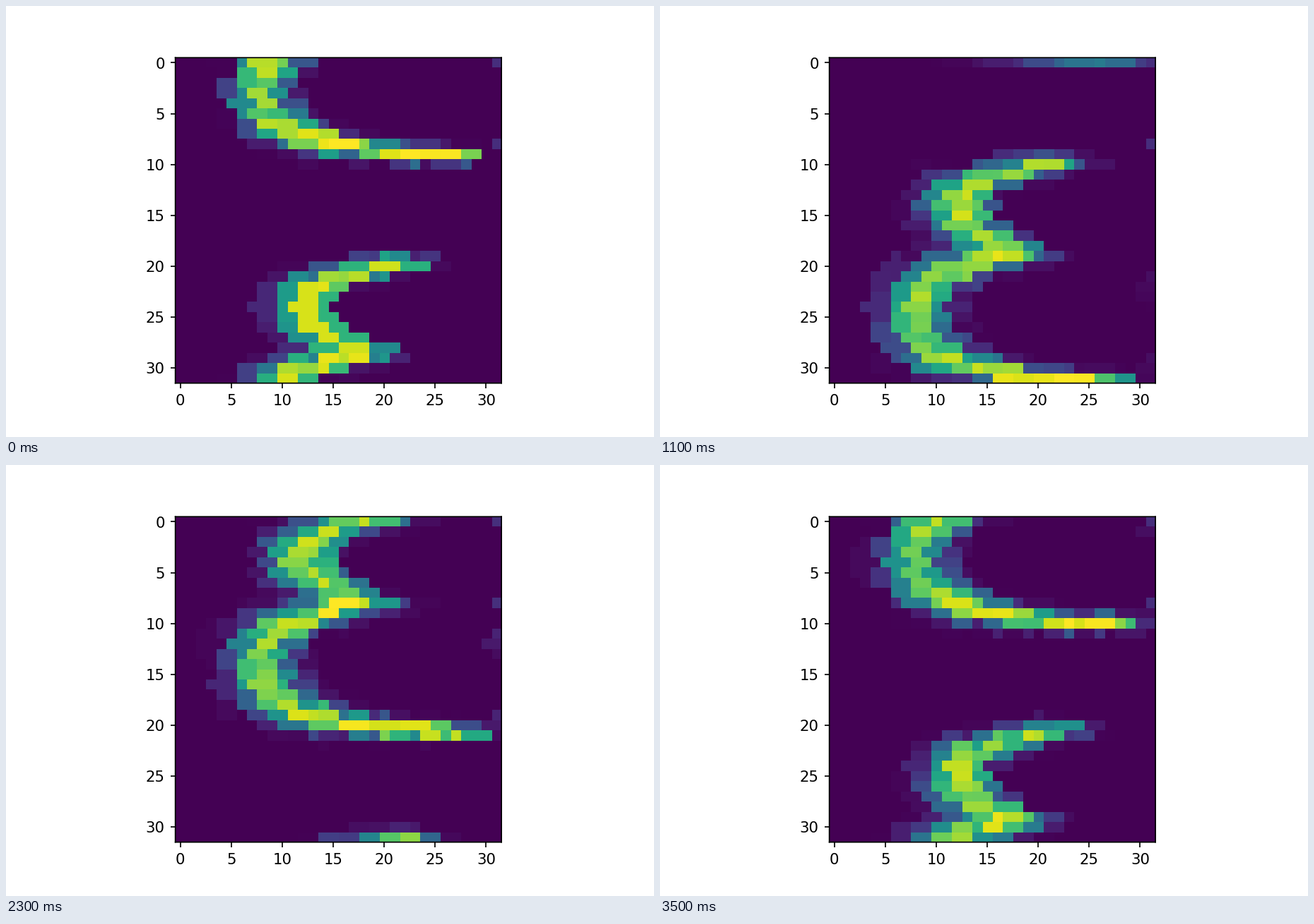
A matplotlib script that plays this animation: 917x611 px, repeating every 3.6 s.

```python
import numpy as np
import matplotlib.pyplot as plt
from matplotlib.animation import FuncAnimation

W, H, DPI = 917, 611, 152.8
LEFT, TOP, SIDE = 239.6, 73.3, 461.4  # plot square in pixels
FRAMES, INTERVAL = 36, 100
SMALL, SIZE, SUB, PAD = 28, 32, 10, 4
CENTER = SIZE / 2
FILL = 0.13  # level of anything outside the digit's square


def band(along, across, keys, low, high):
    """Points between two edges that run straight from key to key."""
    near = (along >= keys[0]) & (along <= keys[-1])
    return (near & (across >= np.interp(along, keys, low))
            & (across <= np.interp(along, keys, high)))


def draw_digit():
    """Antialiased handwritten 7 on a 28 grid, enlarged linearly to 32."""
    t = (np.arange(SMALL * SUB) + 0.5) / SUB
    x, y = np.meshgrid(t, t)
    bar = band(x, y, keys=[6.1, 7, 10, 12, 20.5],
               low=[7.9, 7.28, 7.5, 8.15, 8.25],
               high=[9.2, 9.4, 9.5, 10.2, 10.1])
    leg = band(y, x, keys=[8.6, 11.5, 16.5, 23.5, 25.3, 27],
               low=[19.7, 18.7, 16.15, 11.5, 10.5, 10.5],
               high=[21.9, 20.9, 18.25, 14.2, 14.1, 12.7])
    small = (bar | leg).reshape(SMALL, SUB, SMALL, SUB).mean(axis=(1, 3))
    pos = (np.arange(SIZE) + 0.5) * SMALL / SIZE - 0.5
    lerp = np.maximum(0, 1 - np.abs(pos[:, None] - np.arange(SMALL)))
    return lerp @ small @ lerp.T


digit = np.pad(draw_digit(), PAD, constant_values=FILL)

# Polar grid: rows are angles, columns are radii, snapped to whole pixels.
angle = np.arange(SIZE)[:, None] * 2 * np.pi / SIZE
radius = np.arange(SIZE)[None, :] / 2
dx = np.rint(CENTER + radius * np.cos(angle)) - CENTER
dy = np.rint(CENTER + radius * np.sin(angle)) - CENTER
outside = (dx >= CENTER) | (dy >= CENTER)


def bilinear(x, y):
    x, y = x + PAD, y + PAD
    i, j = np.floor(y).astype(int), np.floor(x).astype(int)
    v, u = y - i, x - j
    top = digit[i, j] * (1 - u) + digit[i, j + 1] * u
    low = digit[i + 1, j] * (1 - u) + digit[i + 1, j + 1] * u
    return top * (1 - v) + low * v


def polar_view(k):
    """Polar picture of the digit turned by k steps of a full circle."""
    a = 2 * np.pi * k / FRAMES
    x = CENTER + dx * np.cos(a) - dy * np.sin(a)
    y = CENTER + dx * np.sin(a) + dy * np.cos(a)
    return np.where(outside, FILL, bilinear(x, y))


plt.rcParams.update({"font.family": "DejaVu Sans", "font.size": 10,
                     "path.snap": False})
fig = plt.figure(figsize=((W + 0.1) / DPI, (H + 0.1) / DPI), dpi=DPI,
                 facecolor="white")
ax = fig.add_axes([LEFT / W, 1 - (TOP + SIDE) / H, SIDE / W, SIDE / H])
image = ax.imshow(polar_view(0), cmap="viridis", interpolation="nearest")
ax.set_xticks(range(0, SIZE, 5))
ax.set_yticks(range(0, SIZE, 5))


def update(k):
    image.set_data(polar_view(k))
    image.autoscale()
    return [image]


anim = FuncAnimation(fig, update, frames=FRAMES, interval=INTERVAL,
                     repeat=True, repeat_delay=0)
plt.show()
```
